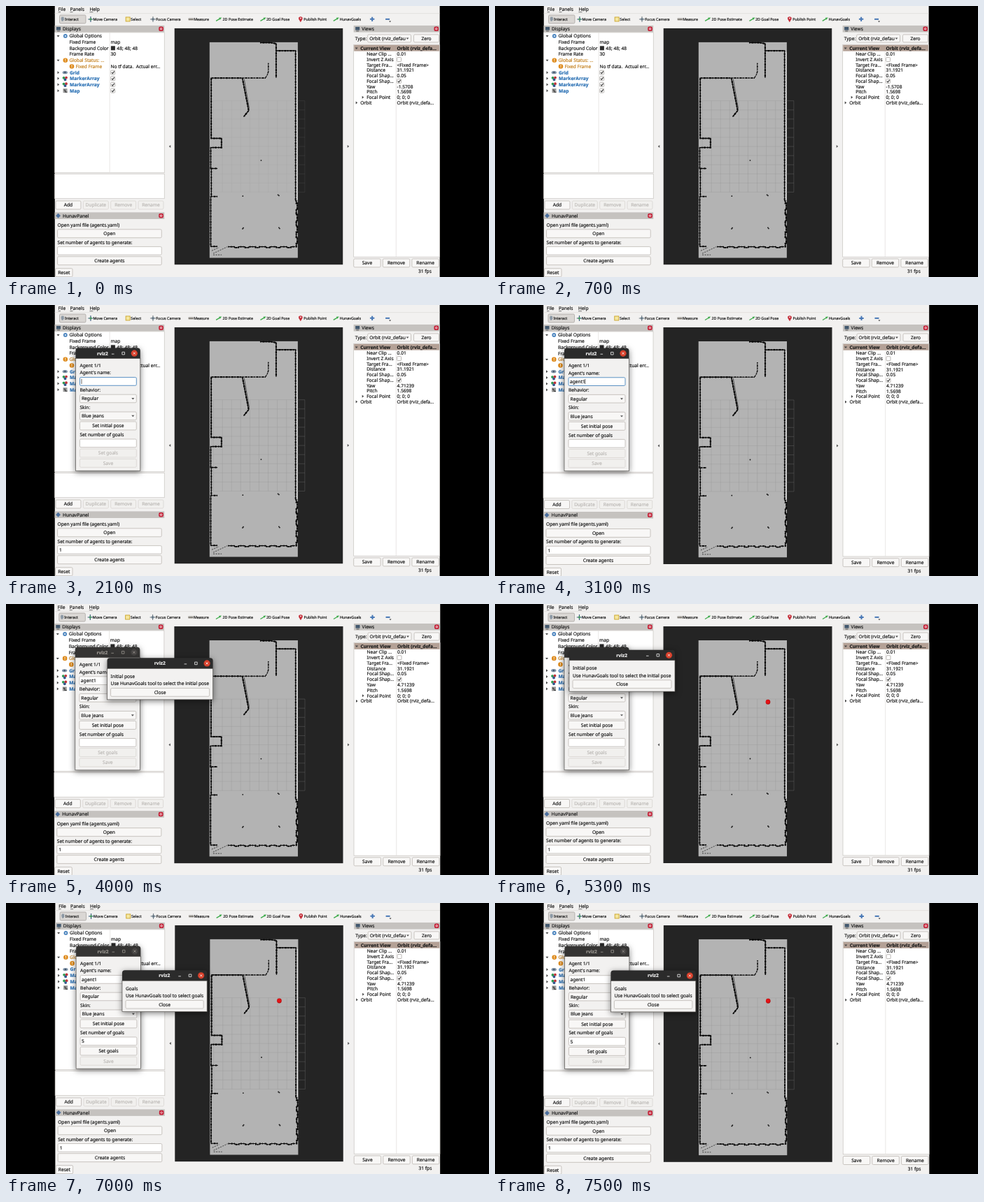
These frames come from a looping animation (690x388 px, 8 s). An HTML page:

```html
<!DOCTYPE html>
<html lang="en">
<head>
<meta charset="utf-8">
<title>Agent setup</title>
<style>
html, body { margin: 0; width: 100%; height: 100%; overflow: hidden; background: #000; }
svg { display: block; width: 100vw; height: 100vh; }
text { font-family: "Noto Sans", "Open Sans", sans-serif; font-size: 6.65px; color: #1c1c1c; fill: currentColor; stroke: currentColor; stroke-width: .2px; white-space: pre; text-rendering: geometricPrecision; }
.window { filter: drop-shadow(0 2px 4px rgba(0, 0, 0, .5)); }
</style>
</head>
<body>
<svg id="stage" viewBox="0 0 690 388"></svg>
<script>
const INK = '#1c1c1c', FADED = '#bcb9b6', BLUE = '#2a70b4', ORANGE = '#c4801f', EDGE = '#c6c2be';

const rect = (x, y, w, h, fill, extra = '') =>
  `<rect x="${x}" y="${y}" width="${w}" height="${h}" fill="${fill}" ${extra}/>`;
const path = (d, stroke, width = 1, extra = '') =>
  `<path d="${d}" fill="none" stroke="${stroke}" stroke-width="${width}" ${extra}/>`;
const fillPath = (d, fill) => `<path d="${d}" fill="${fill}"/>`;
const disc = (x, y, r, fill) => `<circle cx="${x}" cy="${y}" r="${r}" fill="${fill}"/>`;
// y is the middle of the line of text
const text = (x, y, s, extra = '') => `<text x="${x}" y="${y + 2.4}" ${extra}>${s}</text>`;
const mid = (x, y, s, extra = '') => text(x, y, s, `text-anchor="middle" ${extra}`);
const group = (id, body) => `<g id="${id}">${body}</g>`;
const range = n => [...Array(n).keys()];

const button = (x, y, w, label, on = true, h = 12) =>
  rect(x, y, w, h, on ? '#f8f7f6' : '#f1f0ee', `rx="1.6" stroke="${on ? '#bdb8b3' : '#d9d5d1'}" stroke-width=".8"`) +
  mid(x + w / 2, y + h / 2, label, `style="color:${on ? INK : FADED}"`);
const field = (x, y, w, focus = false) =>
  rect(x, y, w, 11.7, '#fff', `rx="1.6" stroke="${focus ? '#5b92c4' : '#bdb8b3'}" stroke-width="${focus ? 1 : .8}"`);
const combo = (x, y, w, label, h = 11.7) =>
  button(x, y, w, '', true, h) + text(x + 2.5, y + h / 2, label) +
  fillPath(`M${x + w - 7} ${y + h / 2 - 1}h4l-2 2.4z`, '#555');
const arrow = (x, y, open) =>
  fillPath(open ? `M${x - 2} ${y - 1}h4l-2 2.5z` : `M${x - 1} ${y - 2}v4l2.5-2z`, '#444');
const check = (x, y, on = true) =>
  rect(x - 3, y - 3, 6, 6, '#fff', 'rx="1" stroke="#aaa6a2" stroke-width=".8"') +
  (on ? path(`M${x - 1.7} ${y}l1.4 1.6l2.4-3.4`, '#333', 1.1) : '');
const panelBar = (x, y, w, label) =>
  rect(x, y, w, 9.6, '#c5c2bf') + text(x + 11.5, y + 4.9, label) +
  rect(x + w - 8, y + 1.5, 6.6, 6.6, '#c31f36', 'rx="2"') +
  disc(x + w - 4.7, y + 4.8, 1.7, '#f4d5d8') + disc(x + w - 4.7, y + 4.8, .8, '#c31f36');
const tree = (y, w, x, h, split) =>
  rect(x, y, w, h, '#fff', `stroke="${EDGE}" stroke-width=".7"`) + path(`M${split} ${y}v${h}`, '#e2e0de', .8);

function toolbar() {
  const small = (x, s) => text(x, 18.7, s, 'style="font-size:5.35px"');
  const green = x => path(`M${x - 4} 21.5L${x + 2} 18`, '#3daa4a', 1.4) + fillPath(`M${x + 4} 16.5l-4 .4l1.8 2.8z`, '#3daa4a');
  const menu = [[74, 'File', 3.5], [91, 'Panels', 4], [119, 'Help', 5]];
  const tools = [[83.5, 'Interact'], [124, 'Move Camera'], [178, 'Select'], [214, 'Focus Camera'], [268, 'Measure'],
    [309.5, '2D Pose Estimate'], [372, '2D Goal Pose'], [425.5, 'Publish Point'], [477, 'HunavGoals']];
  return menu.map(([x, s, w]) => text(x, 5, s) + path(`M${x} 8.7h${w}`, INK, .6)).join('') +
    path('M69 10.7H620', '#dddad7', .7) +
    rect(76, 13, 37.5, 12, '#dad7d4', 'rx="1.6" stroke="#a9a5a1" stroke-width=".8"') +
    tools.map(([x, s]) => small(x, s)).join('') +
    fillPath('M78 18l1-2.5l3 .4l.4 3.4l-1.4 2.4h-2z', '#8d99a5') +
    path('M120.5 15v8M116.8 19h7.4', '#35587c', 1.1) + disc(120.5, 19, 1.7, '#4f9a63') +
    rect(170.8, 16, 6, 6, '#f5e7a0', 'stroke="#c9a227" stroke-width=".9"') +
    disc(209.7, 19, 2.3, '#a9b8c2') + path('M209.7 15v8M205.7 19h8', '#4b5964', .8) +
    path('M260.5 19h7', '#77736b', 2.8) + path('M261.5 18.5h5', '#ddd', .8, 'stroke-dasharray="1 1"') +
    [304, 367.5, 472].map(green).join('') +
    fillPath('M421 23.2l-2.7-4.5a2.8 2.8 0 1 1 5.4 0z', '#c42b37') + disc(421, 17.5, 1, '#f3e0e0') +
    path('M523.5 15.7v6.4M520.3 18.9h6.4', '#4777b5', 2) +
    path('M542.5 18.9h6', '#4777b5', 2) + fillPath('M547.5 21.5h3l-1.5 1.8z', '#333');
}

function displays() {
  const rowY = i => 43 + i * 8.72;
  const gear = (x, y) => disc(x, y, 2.9, '#4d86bf') + disc(x, y, 1, '#fff');
  const warn = (x, y) => disc(x, y, 3.3, '#de8b1d') + path(`M${x} ${y - 2}v2.4M${x} ${y + 1.1}v1`, '#fff', .9);
  const markers = y => disc(82, y - 1, 1.9, '#2f9a52') + disc(85.5, y - 1.3, 1.9, '#c0343b') + disc(84, y + 1.6, 1.9, '#33588e');
  const label = (i, x, s, color = INK, weight = 400) => text(x, rowY(i), s, `style="color:${color};font-weight:${weight}"`);
  let out = panelBar(69, 28, 157, 'Displays') + rect(71.5, 30, 6, 4.6, '#42586e') + path('M72.5 36h4', '#555', 1) +
    tree(38, 157, 69, 201.2, 147.7);
  [0, 4].forEach(i => out += arrow(74, rowY(i), true));
  out += gear(84.3, rowY(0)) + warn(84.3, rowY(4)) + warn(93.5, rowY(5)) +
    label(0, 90, 'Global Options') + label(1, 90, 'Fixed Frame') + label(2, 90, 'Background Color') +
    label(3, 90, 'Frame Rate') + label(4, 90, 'Global Status: …', ORANGE) + label(5, 99, 'Fixed Frame', ORANGE) +
    label(1, 149, 'map') + rect(149.5, rowY(2) - 3, 6, 6, '#2a2a2a') + label(2, 158, '48; 48; 48') +
    label(3, 149, '30') + label(5, 149, 'No tf data.  Actual err…');
  ['Grid', 'MarkerArray', 'MarkerArray', 'Map'].forEach((s, k) => {
    const i = k + 6, y = rowY(i);
    out += arrow(74, y, false) + label(i, 90.5, s, BLUE, 600) + check(152.3, y);
    if (k === 1 || k === 2) out += markers(y);
  });
  out += `<ellipse cx="83.8" cy="${rowY(6)}" rx="3.6" ry="2.2" fill="#7f93a8"/>` + disc(83.8, rowY(6), 1.1, '#39495a') +
    rect(81, rowY(9) - 3, 6, 6, '#9a9a9a') + path(`M82 ${rowY(9) - 1}h2v3h3`, '#333', 1) +
    rect(69, 241, 157, 35.3, '#fff', `stroke="${EDGE}" stroke-width=".7"`);
  ['Add', 'Duplicate', 'Remove', 'Rename'].forEach((s, i) => out += button(70.5 + i * 39.4, 279.6, 36, s, i === 0));
  return out;
}

function agentPanel() {
  return panelBar(69, 296, 157, 'HunavPanel') + fillPath('M74 297.3l3.4 3.5l-3.4 3.5l-3.4-3.5z', '#4b6f9e') +
    text(73, 314, 'Open yaml file (agents.yaml)') + button(73, 320.5, 149, 'Open') +
    text(73, 339, 'Set number of agents to generate:') + field(73, 345.3, 149) +
    group('count', text(75.5, 351.1, '1')) + button(73, 359.5, 149, 'Create agents') +
    button(70, 376.5, 24.5, 'Reset');
}

function views() {
  const rows = [['Near Clip …', '0.01'], ['Invert Z Axis', ''], ['Target Fra…', '&lt;Fixed Frame&gt;'], ['Distance', '31.1921'],
    ['Focal Shap…', '0.05'], ['Focal Shap…', ''], ['Yaw', ''], ['Pitch', '1.5698'], ['Focal Point', '0; 0; 0']];
  const rowY = i => 69 + i * 7.76;
  const bold = 'style="font-weight:600"';
  return panelBar(497, 28, 123, 'Views') + rect(499.5, 30, 6, 4.6, '#42586e') + path('M500.5 36h4', '#555', 1) +
    text(499, 46.7, 'Type:') + combo(517, 41, 62, 'Orbit (rviz_defau', 11) + button(583, 41, 36, 'Zero', true, 11) +
    tree(55.5, 123, 497, 304.5, 557.7) +
    rect(497.5, 56, 122, 8.8, '#b4a196') + arrow(501, 60.5, true) +
    text(506.5, 60.5, 'Current View', bold) + text(559, 60.5, 'Orbit (rviz_defa…', bold) +
    rows.map(([a, b], i) => text(515.5, rowY(i), a) + text(559, rowY(i), b)).join('') +
    check(562, rowY(1), false) + check(562, rowY(5)) +
    `<text id="yaw" x="559" y="${rowY(6) + 2.4}"></text>` +
    arrow(510, rowY(8), false) + arrow(501, rowY(9), false) + text(506.5, rowY(9), 'Orbit') + text(559, rowY(9), 'Orbit (rviz_defa…') +
    ['Save', 'Remove', 'Rename'].map((s, i) => button(497 + i * 41.7, 362.7, 38.5, s)).join('') +
    text(589.5, 380.6, '31 fps');
}

function mapView() {
  // a solid line under wider dashes gives the ragged edge of a scanned wall
  const wall = (d, w = 1.4) => path(d, '#080808', w) + path(d, '#080808', w + .8, 'stroke-dasharray="1.3 2.4 2.6 1.7"');
  const lines = range(11).map(i => `M${296 + i * 13.1} 136v131M296 ${136 + i * 13.1}h131`).join('');
  const bottom = 'M317 345.3' + range(6).map(() => 'h9.5v1.3h5.5v-1.3').join('') + 'h6';
  const right = 'M414.8 279' + range(4).map(() => 'v4h1.4v9h-1.4v3.3').join('') + 'v2';
  const specks = [[364.5, 221.5], [390, 272], [388.7, 271], [338.3, 272.7], [339, 318.4], [338, 319.6], [390, 318], [391, 319.2]];
  return rect(240.5, 32, 241, 339, '#242424') + rect(290.7, 52, 126.3, 309.3, '#b3b3b3') +
    path('M416 66V278', '#dedede', 1.3) +
    `<g id="grid">${path(lines, '#909090', .8, 'stroke-opacity=".35"')}</g>` +
    wall('M363 52.6H378L386 54V103M386 64.2H414') + wall('M413.8 64V280', 1.2) +
    wall('M374.8 82V94Q374 99 371 102.5', .7) + wall('M338 103.3H371', .8) +
    wall('M293 190V103.3H338') + wall('M337.8 104L346.7 150L339.5 159', 1.4) + path('M340.3 105L347.5 147', '#222', .7) +
    wall('M292.3 189.9H307.8V203H292.3') + wall('M292.4 203V233H302M293.2 233V273.3H302M292.4 273V345H302', 1.2) +
    wall(bottom, 1.1) + wall(right) +
    path('M296 355L316 345.5M294 351L304 346.5M296 357H308', '#222', .8, 'stroke-dasharray="2 1.5"') +
    specks.map(([x, y]) => disc(x, y, .9, '#151515')).join('') +
    group('pose', '<ellipse cx="390" cy="140.2" rx="3.3" ry="3.5" fill="#b00c0e"/>' + disc(389.7, 140, 2.8, '#e41316')) +
    fillPath('M235 199.5v4l-2.5-2z', '#555') + fillPath('M488 199.5v4l2.5-2z', '#555');
}

function windowFrame(x, y, w, h, active) {
  const cy = y + 7.6, r = x + w, ink = active ? '#f2f2f2' : '#99958f';
  const titleX = Math.min(x + w / 2 - .3, r - 54);
  return `<g class="window">${rect(x, y, w, 20, active ? '#2b2b2b' : '#353433', 'rx="4"')}` +
    rect(x, y + 15, w, h - 15, '#f2f1f0', 'stroke="#55524f" stroke-width=".7"') + '</g>' +
    mid(titleX, cy, 'rviz2', `style="font-weight:600;color:${ink}"`) +
    path(`M${r - 41} ${cy + 1}h3.6M${r - 26} ${cy - 1.8}h3.6v3.6h-3.6z`, ink, .8) +
    disc(r - 8.5, cy, 4.6, active ? '#d8402b' : '#464443') +
    path(`M${r - 10} ${cy - 1.5}l3 3m0-3l-3 3`, ink, .9);
}

function agentDialog(active, name, goals, caret) {
  const cursor = (x, y) => path(`M${x} ${y - 3.6}v7.2`, '#222', .7);
  return windowFrame(99, 61.7, 92.5, 176, active) +
    text(105, 86.6, 'Agent 1/1') + text(105, 97.1, 'Agent\'s name:') +
    field(105, 103.8, 81, caret === 'name') + text(107, 109.6, name) +
    (caret === 'name' ? cursor(name ? 128.7 : 107.5, 109.6) : '') +
    text(105, 122, 'Behavior:') + combo(105, 128.4, 81, 'Regular') +
    text(105, 147, 'Skin:') + combo(105, 153.3, 81, 'Blue jeans') +
    button(105, 167.3, 81, 'Set initial pose') + text(105, 186.2, 'Set number of goals') +
    field(105, 192.4, 81, caret === 'goals') + text(107, 198.3, goals) +
    (caret === 'goals' ? cursor(111.2, 198.3) : '') +
    button(105, 206.5, 81, 'Set goals', !!goals) + button(105, 220.8, 81, 'Save', false);
}

function popup(x, y, w, title, hint) {
  return windowFrame(x, y, w, 59.5, true) + text(x + 5, y + 26, title) + text(x + 5, y + 36.5, hint) +
    button(x + 5, y + 43.2, w - 10, 'Close', true, 11.7);
}

const posePopup = (x, y) => popup(x, y, 151, 'Initial pose', 'Use HunavGoals tool to select the initial pose');
const goalPopup = () => popup(165, 96.5, 121.5, 'Goals', 'Use HunavGoals tool to select goals');

// One scene per second; the view settles at [shift, scale] in a few 100 ms steps.
const scenes = [
  { view: [0, .998], steps: 1, top: '' },
  { view: [0, .9957], steps: 4, top: '' },
  { view: [0, .998], steps: 2, top: agentDialog(true, '', '', 'name') },
  { view: [0, 1], steps: 2, top: agentDialog(true, 'agent1', '', 'name') },
  { view: [-.2, 1.0015], steps: 3, top: agentDialog(false, 'agent1', '', '') + posePopup(144.7, 77.3) },
  { view: [0, 1], steps: 4, top: agentDialog(false, 'agent1', '', '') + posePopup(106, 65.7) },
  { view: [.8, .996], steps: 2, top: agentDialog(true, 'agent1', '5', 'goals') },
  { view: [.3, .9995], steps: 2, top: agentDialog(false, 'agent1', '5', '') + goalPopup() }
];

const stage = document.getElementById('stage');
stage.innerHTML = rect(0, 0, 690, 388, '#000') + group('screen',
  rect(69.2, -2, 551, 394, '#f2f1f0') + toolbar() + displays() + agentPanel() + views() + mapView() +
  scenes.map((s, i) => group('top' + i, s.top)).join(''));

const byId = id => document.getElementById(id);
const show = (id, on) => byId(id).setAttribute('display', on ? 'inline' : 'none');

function draw(t) {
  const n = Math.floor(t / 1000), { view, steps } = scenes[n];
  const from = scenes[Math.max(0, n - 1)].view;
  const p = Math.min(1, (Math.floor((t % 1000) / 100) + 1) / steps);
  const [shift, scale] = view.map((v, i) => from[i] + (v - from[i]) * p);
  byId('screen').setAttribute('transform', `translate(${345 * (1 - scale) + shift} 0) scale(${scale})`);
  byId('grid').setAttribute('opacity', .5 + .5 * Math.min(7, Math.floor(t / 100)) / 7);
  byId('yaw').textContent = n ? '4.71239' : '-1.5708';
  show('count', n >= 1);
  show('pose', n >= 5);
  scenes.forEach((s, i) => show('top' + i, i === n));
}

function tick() {
  draw(performance.now() % 8000);
  requestAnimationFrame(tick);
}
tick();
</script>
</body>
</html>
```
